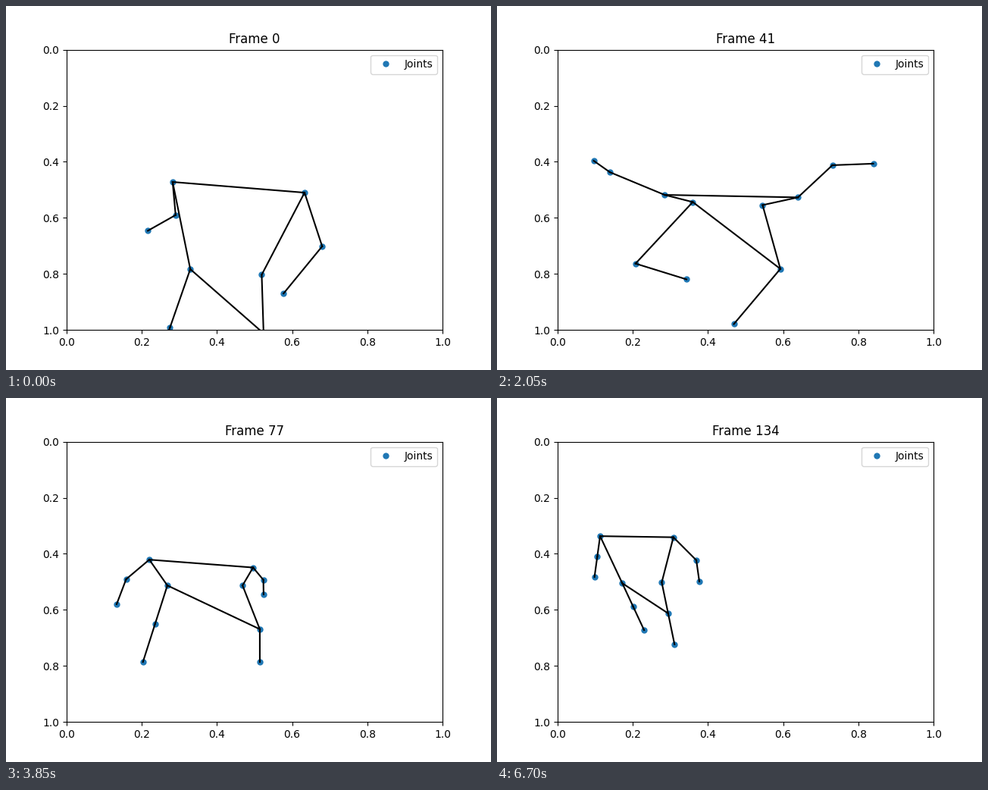
A matplotlib script for the animation above (6750 ms loop, 640x480 px).

```python
import numpy as np
import matplotlib.pyplot as plt
from matplotlib.animation import FuncAnimation

FRAMES, INTERVAL = 135, 50

# Limbs: left arm, right arm, left leg, right leg; three joints each
BONES = [(0, 3), (0, 1), (1, 2), (3, 4), (4, 5), (0, 6), (3, 9),
         (6, 7), (7, 8), (6, 10), (9, 10), (10, 11)]


def limb(x, y, tip_x, tip_y, bend=0, along=.5):
    """Root and tip; the middle joint follows from the bend."""
    return x, y, tip_x, tip_y, bend, along


# Key poses of the jump, in axes units
poses = {
    0: [limb(.282, .472, .216, .646, -.265, .578),
        limb(.633, .510, .577, .870, -.208),
        limb(.329, .783, .221, 1.199),
        limb(.519, .803, .529, 1.221)],
    31: [limb(.246, .467, .170, .483, .153, .915),
         limb(.676, .471, .726, .504, -.488, .678),
         limb(.299, .717, .333, .902, .936, 1.152),
         limb(.567, .728, .525, 1.182, -.403)],
    51: [limb(.323, .569, .262, .340, -.25, .55),
         limb(.583, .583, .704, .355, .05),
         limb(.420, .389, .347, .114, .05),
         limb(.513, .402, .414, .088)],
    77: [limb(.220, .421, .133, .580, .114),
         limb(.496, .449, .524, .545, -.14),
         limb(.268, .513, .203, .786),
         limb(.468, .513, .514, .786, -.07, .583)],
    95: [limb(.107, .579, .182, .451),
         limb(.262, .591, .230, .426, .239),
         limb(.195, .438, .236, .732, -.121),
         limb(.299, .462, .380, .767, -.249, .607)],
    111: [limb(.143, .338, .027, .494),
          limb(.371, .354, .476, .510),
          limb(.161, .530, .266, .768),
          limb(.277, .534, .244, .748)],
    134: [limb(.113, .337, .098, .483),
          limb(.308, .341, .377, .499, -.134, .577),
          limb(.172, .505, .230, .672),
          limb(.277, .502, .311, .723)],
}

# Between poses the hands swing out and the feet reach down
SWING = [.32, .12, 0, .16, .14, 0]
REACH = [0, .35, .35, .12, .06, 0]

times = np.array(list(poses))
keys = np.array(list(poses.values()))


def slopes():
    """Overshoot-free tangents: harmonic mean of neighbouring slopes."""
    d = np.diff(keys, axis=0) / np.diff(times)[:, None, None]
    a, b = d[:-1], d[1:]
    same = a * b > 0
    mid = np.where(same, 2 * a * b / np.where(same, a + b, 1), 0)
    return np.concatenate([d[:1], mid, d[-1:]])


tangents = slopes()


def limbs_at(n):
    i = min(np.searchsorted(times, n, side="right") - 1, len(times) - 2)
    h = times[i + 1] - times[i]
    s = (n - times[i]) / h
    ease = s * s * (3 - 2 * s)
    limbs = (keys[i] + (keys[i + 1] - keys[i]) * ease
             + h * s * (1 - s) ** 2 * tangents[i]
             - h * s * s * (1 - s) * tangents[i + 1])
    bump = np.sin(np.pi * s) ** 2
    limbs[:2, 2] += np.array([-1, 1]) * SWING[i] * bump
    limbs[2:, 3] += REACH[i] * bump
    return limbs


def joints_at(n):
    limbs = limbs_at(n)
    root, tip = limbs[:, :2], limbs[:, 2:4]
    bend, along = limbs[:, 4:5], limbs[:, 5:6]
    span = tip - root
    side = np.stack([-span[:, 1], span[:, 0]], axis=1)
    middle = root + along * span + bend * side
    return np.stack([root, middle, tip], axis=1).reshape(-1, 2)


fig, ax = plt.subplots(figsize=(6.4, 4.8), dpi=100)
ax.set_xlim(0, 1)
ax.set_ylim(1, 0)
dots, = ax.plot([], [], "o", ms=5, color="tab:blue", label="Joints")
bones = [ax.plot([], [], "k-", lw=1.5)[0] for _ in BONES]
ax.legend(loc="upper right")
title = ax.set_title("Frame 0")


def update(n):
    p = joints_at(n)
    dots.set_data(p[:, 0], p[:, 1])
    for line, pair in zip(bones, BONES):
        line.set_data(*p[list(pair)].T)
    title.set_text(f"Frame {n}")
    return [dots, title, *bones]


anim = FuncAnimation(fig, update, frames=FRAMES, interval=INTERVAL,
                     repeat=True, repeat_delay=0, blit=False)
plt.show()
```
